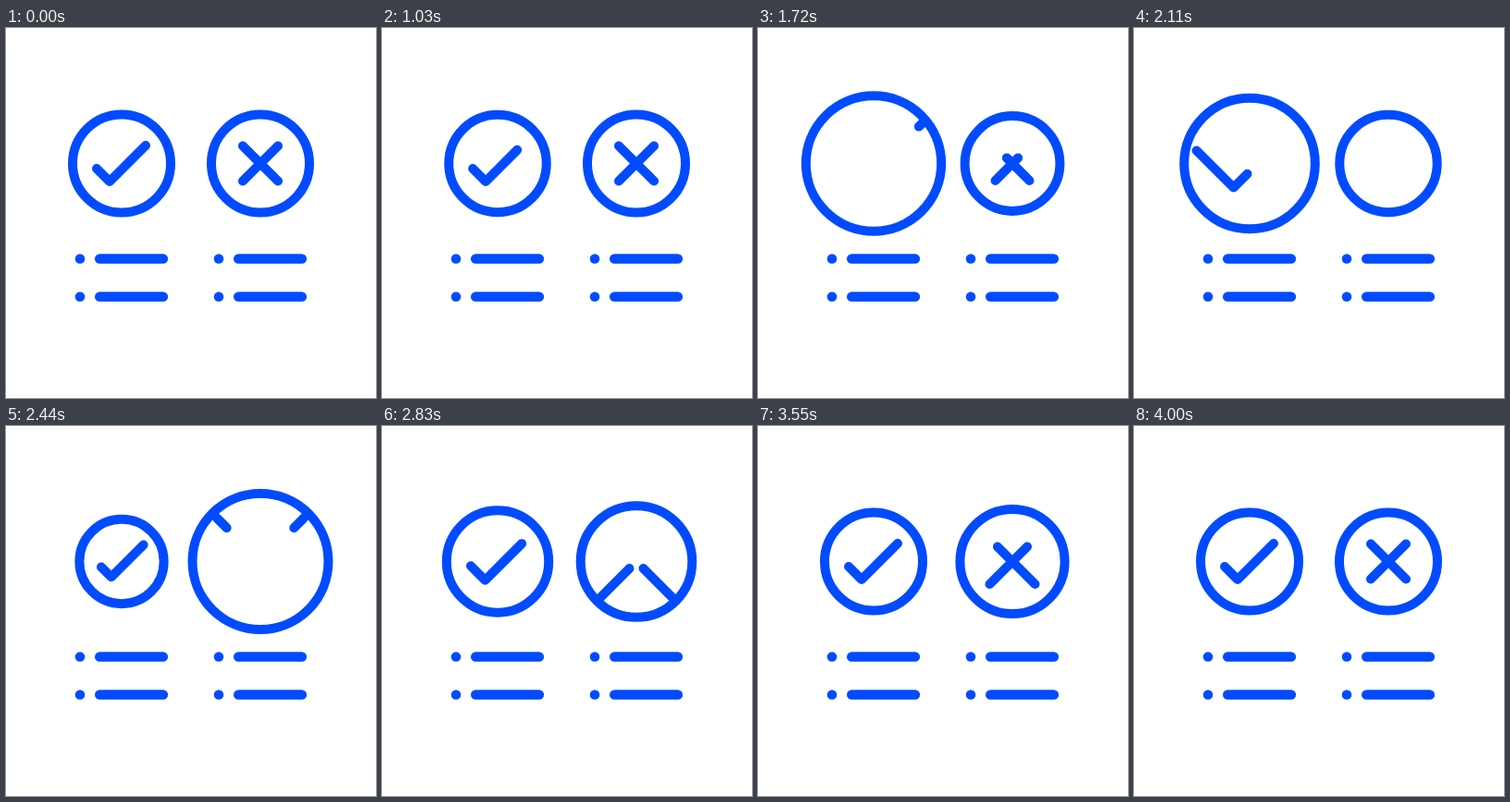
Animation of 400 by 400 pixels, one loop 4120 ms. Source, as an HTML page with a canvas:

```html
<!DOCTYPE html>
<html lang="en">
<head>
<meta charset="utf-8">
<title>Pros and cons</title>
<style>
  html, body { margin: 0; width: 100%; height: 100%; overflow: hidden; background: #fff; }
  canvas { display: block; width: 400px; height: 400px; }
</style>
</head>
<body>
<canvas id="stage" width="400" height="400"></canvas>
<script>
const ctx = document.getElementById('stage').getContext('2d');
const LOOP = 4120, STEP = 30, REST = 53, START = 1000, ERASE_SPEED = 0.225;

// Each key is [time, value]; values ease in and out between keys.
const radiusKeys = peak => [
  [START, REST], [1270, 45], [1850, peak], [1990, peak],
  [2400, 45.5], [2980, 57], [3360, REST]
];
const slideKeys = rebound => [[1640, -97], [2130, 40], [2440, -2], [2900, rebound], [3360, 0]];

// Mark paths run from rim to rim; from/to is the part visible at rest.
const tick = {
  x: 125, delay: 0, radius: radiusKeys(77), slide: slideKeys(1.5),
  paths: [[[39, -32.5], [-13, 19.5], [-43, -10.5]]],
  from: 18.4, to: 93.3, length: 116
};
const cross = {
  x: 275, delay: 640, radius: radiusKeys(74), slide: slideKeys(5.6),
  paths: [[[-34, -34], [34, 34]], [[34, -34], [-34, 34]]],
  from: 21.2, to: 75, length: 96.2
};

function ease(keys, t) {
  if (t <= keys[0][0]) return keys[0][1];
  for (let i = 1; i < keys.length; i++) {
    const [t0, v0] = keys[i - 1], [t1, v1] = keys[i];
    if (t < t1) return v0 + (v1 - v0) * (1 - Math.cos(Math.PI * (t - t0) / (t1 - t0))) / 2;
  }
  return keys[keys.length - 1][1];
}

function visibleSpan(badge, t) {
  const { from, to, length, slide } = badge;
  if (t < slide[0][0]) return [from + Math.max(0, t - START) * ERASE_SPEED, to];
  const shift = ease(slide, t);
  return [Math.max(0, from + shift), Math.min(length, to + shift)];
}

function drawBadge(badge, time) {
  const t = time - badge.delay;
  const r = ease(badge.radius, t), scale = r / REST;
  const [a, b] = visibleSpan(badge, t);
  ctx.save();
  ctx.translate(badge.x, 146.5);
  ctx.lineWidth = 10;
  ctx.beginPath();
  ctx.arc(0, 0, r, 0, 2 * Math.PI);
  ctx.stroke();
  if (b > a) {
    ctx.setLineDash([(b - a) * scale, 1000]);
    ctx.lineDashOffset = -a * scale;
    for (const path of badge.paths) {
      ctx.beginPath();
      for (const [x, y] of path) ctx.lineTo(x * scale, y * scale);
      ctx.stroke();
    }
  }
  ctx.restore();
}

function drawRow(x, y) {
  ctx.beginPath();
  ctx.arc(x, y, 5.3, 0, 2 * Math.PI);
  ctx.fill();
  ctx.lineWidth = 10.6;
  ctx.beginPath();
  ctx.moveTo(x + 21.3, y);
  ctx.lineTo(x + 89.8, y);
  ctx.stroke();
}

function draw(now) {
  const t = Math.floor((now % LOOP - 10) / STEP) * STEP + 10;
  ctx.clearRect(0, 0, 400, 400);
  ctx.strokeStyle = ctx.fillStyle = '#004bff';
  ctx.lineCap = ctx.lineJoin = 'round';
  drawBadge(tick, t);
  drawBadge(cross, t);
  for (const x of [80, 230]) for (const y of [249.5, 290.5]) drawRow(x, y);
}

const begin = performance.now();
function loop() {
  draw(performance.now() - begin);
  requestAnimationFrame(loop);
}
loop();
</script>
</body>
</html>
```
